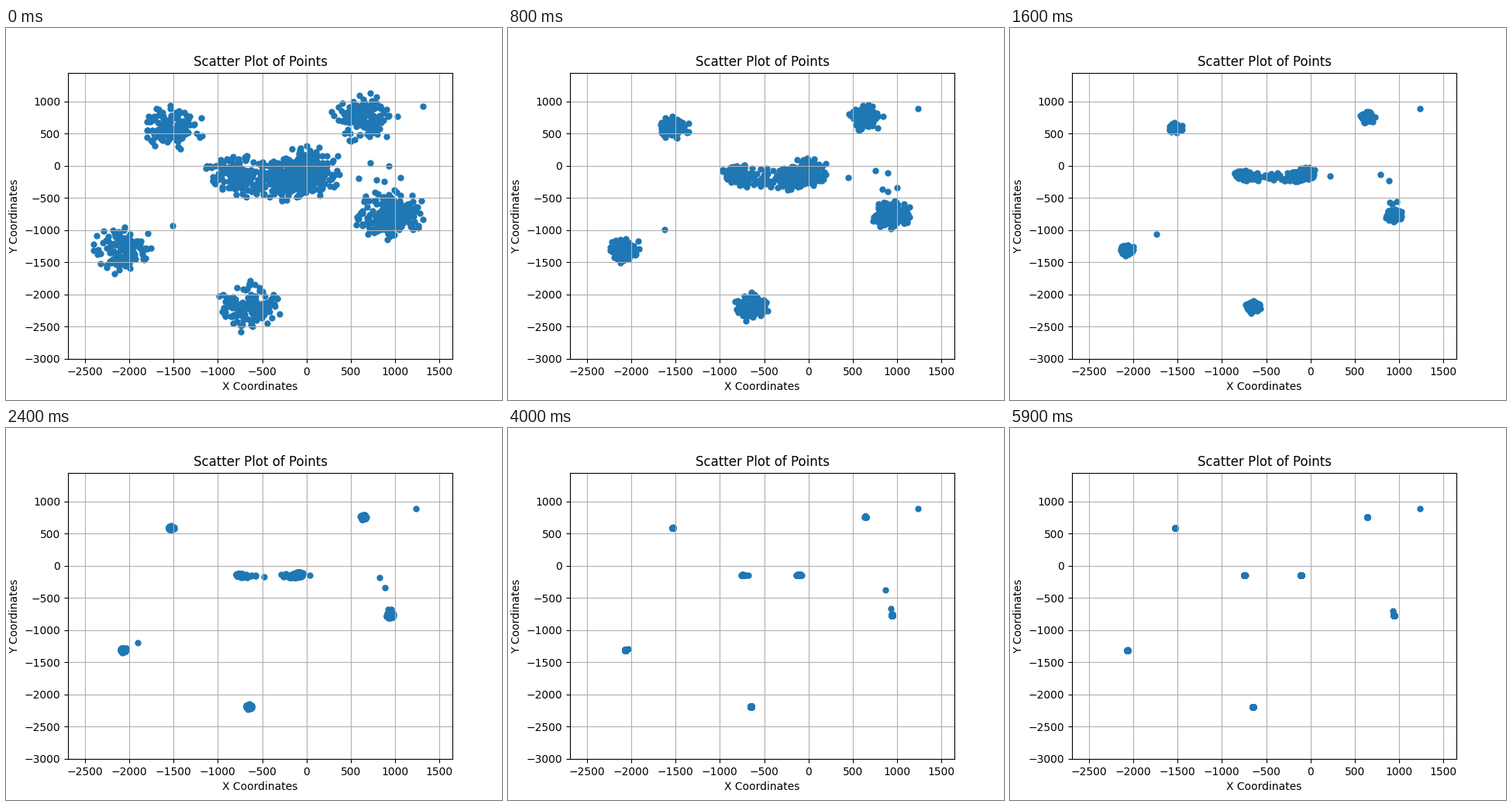
These frames come from a looping animation (640 px wide and 480 px high, 6 s). A matplotlib script:

```python
import numpy as np
import matplotlib.pyplot as plt
from matplotlib.animation import FuncAnimation

FRAMES = 60
INTERVAL = 100
RADIUS = 350   # neighbourhood of the mean shift
RATE = 0.1     # share of the way to the local mean per step

# Resting point x, y, initial offset x, y, spread, point count
BLOBS = [
    (-1531, 589, 0, 0, 150, 130),
    (-767, -143, -30, 0, 150, 140),
    (-102, -143, -180, -60, 155, 160),
    (-102, -143, 110, 37, 165, 270),
    (643, 760, 0, 0, 155, 140),
    (945, -770, 15, 0, 165, 220),
    (-2067, -1312, 0, 0, 145, 130),
    (-649, -2192, 0, 0, 160, 130),
]

# Points that never join a blob, and the neighbours that pull on them
LONERS = np.array([(1317, 929), (-1511, -927), (721, 49), (931, 1)], float)
PULLERS = np.array([(1028, 772), (-1791, -1047), (1063, -180),
                    (879, -240), (791, -216), (590, -192)], float)

rng = np.random.default_rng(7)


def make_blob(x, y, dx, dy, spread, count):
    """Gaussian cloud cut at 2.6 spreads, with free space round the loners."""
    cut = 1 - np.exp(-2.6 ** 2 / 2)
    r = spread * np.sqrt(-2 * np.log(1 - cut * rng.random(count)))
    a = rng.uniform(0, 2 * np.pi, count)
    cloud = np.column_stack([r * np.cos(a), r * np.sin(a)])
    cloud += (x + dx, y + dy) - cloud.mean(axis=0)
    gap = np.linalg.norm(cloud[:, None] - LONERS[None], axis=2).min(axis=1)
    return cloud[gap > RADIUS + 30]


def step(p):
    """Move every point towards the mean of its neighbours."""
    sq = (p ** 2).sum(axis=1)
    near = sq[:, None] + sq[None, :] - 2 * p @ p.T < RADIUS ** 2
    near = near.astype(float)
    mean = near @ p / near.sum(axis=1, keepdims=True)
    return p + RATE * (mean - p)


def simulate(blobs):
    states = [np.vstack(blobs + [LONERS, PULLERS])]
    for _ in range(FRAMES - 1):
        states.append(step(states[-1]))
    return states


def recentre(blobs, final):
    """Nudge the blobs so that they settle on their resting points."""
    moved, start = [], 0
    for blob, row in zip(blobs, BLOBS):
        settled = np.median(final[start:start + len(blob)], axis=0)
        moved.append(blob + np.clip(row[:2] - settled, -50, 50))
        start += len(blob)
    return moved


blobs = [make_blob(*row) for row in BLOBS]
for _ in range(2):
    blobs = recentre(blobs, simulate(blobs)[-1])
states = simulate(blobs)

fig, ax = plt.subplots(figsize=(6.4, 4.8), dpi=100)
dots = ax.scatter(*states[0].T, s=25)
ax.set_xlim(-2693, 1649)
ax.set_ylim(-3005.5, 1449.5)
ax.set_title("Scatter Plot of Points")
ax.set_xlabel("X Coordinates")
ax.set_ylabel("Y Coordinates")
ax.grid(True)


def draw(i):
    dots.set_offsets(states[i])
    return (dots,)


anim = FuncAnimation(fig, draw, frames=FRAMES, interval=INTERVAL,
                     repeat=True, repeat_delay=0)
plt.show()
```
